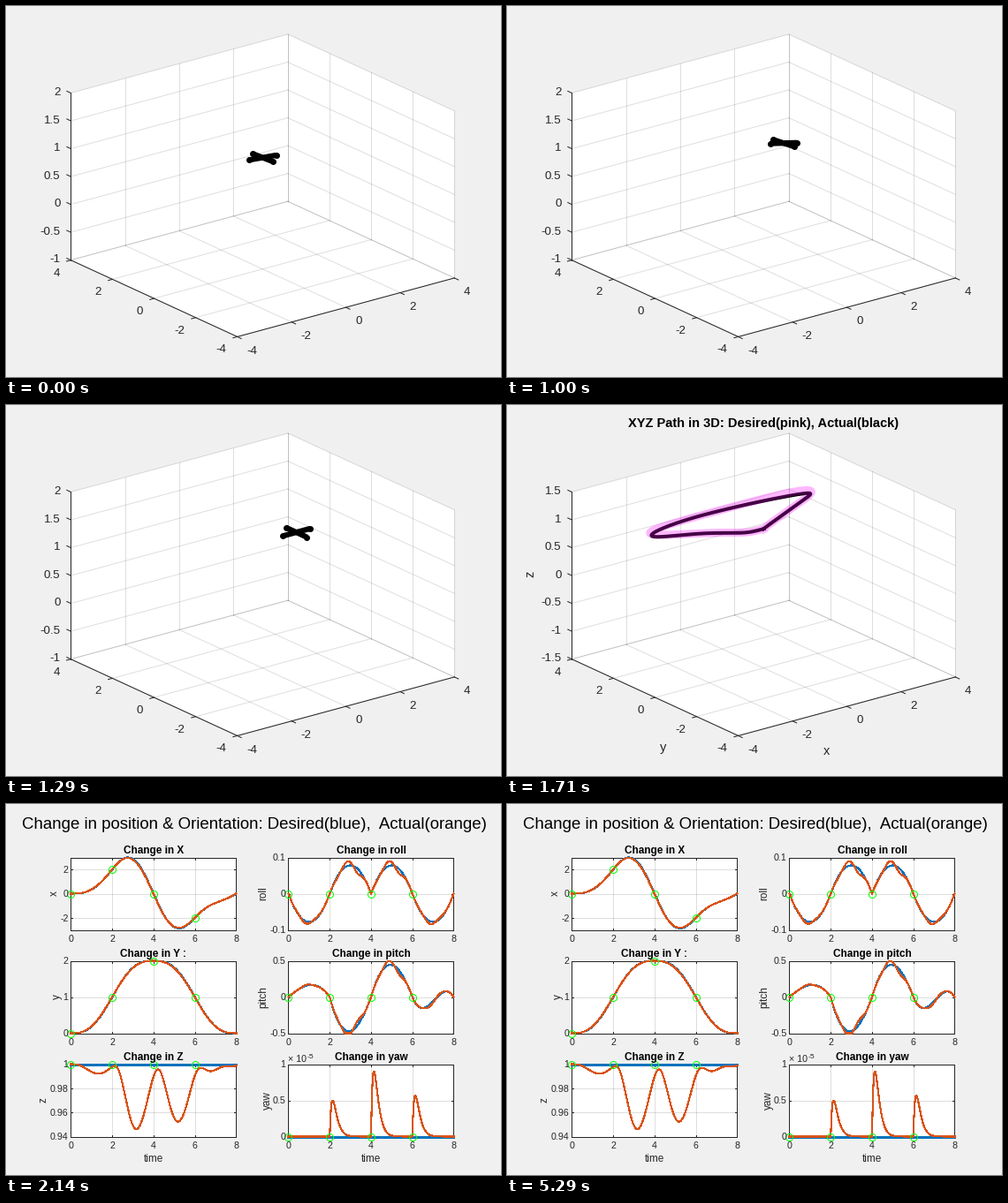
A matplotlib script for the animation above (5440 ms loop, 560 px wide and 420 px high).

```python
import numpy as np
import matplotlib.pyplot as plt
from matplotlib.animation import FuncAnimation
from matplotlib.patches import Polygon, Rectangle
from numpy.polynomial import Polynomial

W, H, DPI = 560, 420, 80
PT = 72 / DPI                      # points per pixel
LOOP, STEP = 5440, 20
INK, GRAY = (0.15, 0.15, 0.15), (0.94, 0.94, 0.94)
BLUE, ORANGE, GREEN = "#0072BD", "#D95319", "#00FF00"

plt.rcParams["font.family"] = "Liberation Sans"
fig = plt.figure(figsize=(W / DPI, H / DPI), dpi=DPI, facecolor=GRAY)


# ---------- flight model ----------
LEG = 2                            # seconds between waypoints
LIFT = 9.6                         # acceleration per radian of tilt
EASE = Polynomial([0, 0, 0, 10, -15, 6])
LEAVE = Polynomial([0, 1, 0, -6, 8, -3])
ARRIVE = Polynomial([0, 0, 0, -4, 7, -3])

time = np.linspace(0, 8, 801)
marks = np.array([0, 2, 4, 6])


def leg(t):
    i = np.clip(np.asarray(t) // LEG, 0, 3).astype(int)
    return i, t - LEG * i


def route(stops, speeds):
    """Quintic legs with zero acceleration at every waypoint."""
    p, v = np.array(stops, float), LEG * np.array(speeds, float)

    def f(t, order=0):
        i, tau = leg(t)
        ease, leave, arrive = (b.deriv(order)(tau / LEG)
                               for b in (EASE, LEAVE, ARRIVE))
        value = ((p[i + 1] - p[i]) * ease + v[i] * leave
                 + v[i + 1] * arrive) / LEG**order
        return value + p[i] if order == 0 else value
    return f


def eased(*turns):
    """Smooth steps between turning points."""
    t, v = np.array(turns, float).T

    def f(x):
        i = np.clip(np.searchsorted(t, x) - 1, 0, len(t) - 2)
        u = (x - t[i]) / (t[i + 1] - t[i])
        return v[i] + (v[i + 1] - v[i]) * u * u * (3 - 2 * u)
    return f


def wobble(*gains):
    """One windowed oscillation per leg; its second swing is rescaled."""
    gain, fade, period, peak = np.array(gains), np.array([0.5, 1.55, 1.4, 0.6]), 1.22, 0.83

    def f(t):
        i, tau = leg(t)
        scale = np.where(tau < peak + period / 4, 1, fade[i])
        wave = np.cos(2 * np.pi * (tau - peak) / period)
        return -gain[i] * scale * wave * np.sin(np.pi * tau / LEG) ** 2
    return f


def spikes(t):
    total = 0 * t
    for start, peak in ((2, 0.5), (4, 0.9), (6, 0.57)):
        s = np.maximum(t - start, 0) / 0.14
        total = total - peak * s * np.exp(1 - s)
    return total


path_x = route((0, 2, 0, -2, 0), (0, 2.1, -3.9, 1.75, 1))
path_y = route((0, 1, 2, 1, 0), (0, 1, 0, -1, 0))

want = {
    "x": path_x,
    "y": path_y,
    "z": lambda t: 1 + 0 * t,
    "roll": lambda t: -path_y(t, 2) / LIFT,
    "pitch": lambda t: path_x(t, 2) / LIFT,
    "yaw": lambda t: 0 * t,
}

# height is lost with the square of the tilt, after a short lag
tilt = want["roll"](time) ** 2 + want["pitch"](time) ** 2
lag = 64 * time * np.exp(-8 * time) * time[1]
sag = 0.25 * np.convolve(tilt, lag)[:len(time)]

error = {
    "x": eased((0, 0), (1.8, -0.021), (3.25, 0.073), (4.1, 0.037),
               (5.3, -0.046), (6.2, -0.012), (7, 0.003), (8, -0.014)),
    "y": eased((0, 0), (1.55, -0.012), (3.2, 0.0073), (3.85, -0.0008),
               (5.2, 0.0185), (6.1, 0.01), (7.3, -0.0014), (8, -0.0008)),
    "z": lambda t: np.interp(t, time, sag),
    "roll": wobble(-0.0063, 0.013, 0.0136, -0.0075),
    "pitch": wobble(0.014, -0.059, 0.059, -0.03),
    "yaw": spikes,
}


def actual(name, t):
    return want[name](t) - error[name](t)


# ---------- drawing helpers ----------
def scene():
    """Full-figure axes where whole numbers are pixel centres."""
    ax = fig.add_axes([0, 0, 1, 1])
    ax.axis("off")
    ax.set(xlim=(-0.49, W - 0.49), ylim=(H - 0.51, -0.51))
    return ax


def line(ax, xs, ys, color=INK, width=1.0, **kw):
    return ax.plot(xs, ys, color=color, lw=width * PT, **kw)[0]


def grid(ax, xs, ys):
    line(ax, xs, ys, alpha=0.15)


def text(ax, x, y, s, size, ha="center", color=INK, **kw):
    """Place text with its capitals centred on y."""
    ax.text(x, y + 0.36 * size, s, size=size * PT, ha=ha, va="baseline",
            color=color, **kw)


def axis_name(ax, x, y, s, size, turn=90):
    ax.text(x, y, s, size=size * PT, ha="center", va="center", color=INK,
            rotation=turn)


# ---------- 3D scenes ----------
def project(x, y, z, low):
    return (289.8 + 30.7 * x - 23.55 * y,
            297.3 - 8.31 * x - 10.84 * y - 63.07 * (z - low))


def box3d(ax, low):
    high, size = low + 3, 13.33
    steps, levels = range(-4, 5, 2), np.linspace(low, high, 7)

    def run(a, b, draw=grid):
        draw(ax, *zip(project(*a, low), project(*b, low)))

    def tick(p, dx, dy):
        x, y = project(*p, low)
        line(ax, [x, x + dx], [y, y + dy])
        return x, y

    hull = [(-4, 4, low), (-4, 4, high), (4, 4, high), (4, -4, high),
            (4, -4, low), (-4, -4, low)]
    ax.add_patch(Polygon([project(*p, low) for p in hull], fc="white"))
    for v in steps:
        run((v, -4, low), (v, 4, low))
        run((v, 4, low), (v, 4, high))
        run((-4, v, low), (4, v, low))
        run((4, v, low), (4, v, high))
    for z in levels:
        run((-4, 4, z), (4, 4, z))
        run((4, 4, z), (4, -4, z))
    for end in ((4, -4, low), (-4, 4, low)):
        run((-4, -4, low), end, line)
    run((-4, 4, low), (-4, 4, high), line)

    for v in steps:
        x, y = tick((v, -4, low), 4.5, 2.1)
        text(ax, x + 10.6, y + 14.3, f"{v}", size, "left")
        x, y = tick((-4, v, low), -4.8, 1.3)
        text(ax, x - 12.2, y + 13.2, f"{v}", size, "right")
    for z in levels:
        x, y = tick((-4, 4, z), -4.5, -2.1)
        text(ax, x - 11.8, y - 2, f"{z:g}", size, "right")


def flight_scene():
    ax = scene()
    box3d(ax, -1)
    arms = [line(ax, [], [], "black", 6.2, marker="o", ms=7 * PT, mew=0,
                 solid_capstyle="butt") for _ in range(2)]
    return ax, arms


def pose(arms, t):
    x, y, z, roll, pitch = (actual(n, t)
                            for n in ("x", "y", "z", "roll", "pitch"))
    s = np.array([-0.5, 0.5])
    arms[0].set_data(*project(x + s * np.cos(pitch), y + 0 * s,
                              z - s * np.sin(pitch), -1))
    arms[1].set_data(*project(x + 0 * s, y + s * np.cos(roll),
                              z + s * np.sin(roll), -1))


def path_scene():
    ax = scene()
    box3d(ax, -1.5)
    line(ax, *project(*(actual(n, time) for n in "xyz"), -1.5), "black", 4)
    line(ax, *project(*(want[n](time) for n in "xyz"), -1.5), "magenta", 9,
         alpha=0.28)
    text(ax, 289.5, 19, "XYZ Path in 3D: Desired(pink), Actual(black)", 14.67,
         color="black", weight="bold")
    axis_name(ax, 361, 391, "x", 14.67, 0)
    axis_name(ax, 176, 387, "y", 14.67, 0)
    axis_name(ax, 26, 191, "z", 14.67)
    return ax


# ---------- plot scenes ----------
def panel(ax, slot, name, title, name_x, lim, ticks, curves):
    col, row = divmod(slot, 3)
    left, top, wide, tall = (73, 319)[col], 60 + 117 * row, 187, 82
    right, base = left + wide, top + tall
    low, high = lim

    def px(t):
        return left + np.asarray(t) * wide / 8

    def py(v):
        return top + (high - np.clip(v, low, high)) / (high - low) * tall

    ax.add_patch(Rectangle((left, top), wide, tall, fc="white"))
    for t in range(0, 9, 2):
        x = px(t)
        grid(ax, [x, x], [top, base])
        for edge, d in ((top, 2), (base, -2)):
            line(ax, [x, x], [edge, edge + d])
        text(ax, x, base + 10, f"{t}", 10.67)
    for v in ticks:
        y = py(v)
        grid(ax, [left, right], [y, y])
        for edge, d in ((left, 2), (right, -2)):
            line(ax, [edge, edge + d], [y, y])
        text(ax, left - 3, y, f"{v:g}", 10.67, "right")
    ax.add_patch(Rectangle((left, top), wide, tall, fill=False, ec=INK,
                           lw=PT))
    for f, color in curves:
        line(ax, px(time), py(f(time)), color, 1.1, antialiased=False)
    line(ax, px(marks), py(curves[0][0](marks)), GREEN, ls="none", marker="o",
         ms=8 * PT, mfc="none", mew=PT)

    text(ax, left + wide / 2, top - 9, title, 11.73, color="black",
         weight="bold")
    axis_name(ax, name_x, top + tall / 2, name, 11.73)
    if row == 2:
        text(ax, left + wide / 2, base + 24, "time", 11.73)
    if name == "yaw":
        text(ax, left, top - 6, "× 10", 10.67, "left")
        text(ax, left + 21, top - 10, "-5", 8.5, "left")


def states_scene():
    ax = scene()
    text(ax, 280, 21,
         "Change in position & Orientation: Desired(blue),  Actual(orange)",
         18.67, color="black")
    specs = [
        ("x", "X", 54, (-3, 3), (-2, 0, 2)),
        ("y", "Y :", 57, (0, 2), (0, 1, 2)),
        ("z", "Z", 42, (0.94, 1), (0.94, 0.96, 0.98, 1)),
        ("roll", "roll", 291, (-0.1, 0.1), (-0.1, 0, 0.1)),
        ("pitch", "pitch", 291, (-0.5, 0.5), (-0.5, 0, 0.5)),
        ("yaw", "yaw", 295, (0, 1), (0, 0.5, 1)),
    ]
    for slot, (name, label, name_x, lim, ticks) in enumerate(specs):
        curves = [(want[name], BLUE),
                  (lambda t, n=name: actual(n, t), ORANGE)]
        panel(ax, slot, name, "Change in " + label, name_x, lim, ticks, curves)
    return ax


def errors_scene():
    ax = scene()
    text(ax, 277, 21,
         "Errors for positions and Orientations: Desired - Actual",
         18.67, color="black")
    specs = [
        ("x", 40, (-0.05, 0.1), (-0.05, 0, 0.05, 0.1)),
        ("y", 40, (-0.0122, 0.02), (-0.01, 0, 0.01, 0.02)),
        ("z", 43, (0, 0.06), (0, 0.02, 0.04, 0.06)),
        ("roll", 283, (-0.0128, 0.0125), (-0.01, 0, 0.01)),
        ("pitch", 285, (-0.0555, 0.0555), (-0.05, 0, 0.05)),
        ("yaw", 292, (-1, 0), (-1, -0.5, 0)),
    ]
    for slot, (name, name_x, lim, ticks) in enumerate(specs):
        panel(ax, slot, name, "Error in " + name, name_x, lim, ticks,
              [(error[name], BLUE)])
    return ax


# ---------- animation ----------
flight, arms = flight_scene()
path, states, errors = path_scene(), states_scene(), errors_scene()
order = [flight, path, states, errors, states]
cuts = [1710, 2140, 3140, 5290]


def update(i):
    now = i * STEP + STEP / 2
    shown = order[np.searchsorted(cuts, now, side="right")]
    for ax in (flight, path, states, errors):
        ax.set_visible(ax is shown)
    # the drone moves seven times a second, 0.2 s of flight each time
    pulse = int((now + 5) * 0.007)
    pose(arms, 0.2 * (min(pulse, 11) + 1))
    return []


anim = FuncAnimation(fig, update, frames=LOOP // STEP, interval=STEP,
                     repeat=True, repeat_delay=0, cache_frame_data=False)
plt.show()
```
